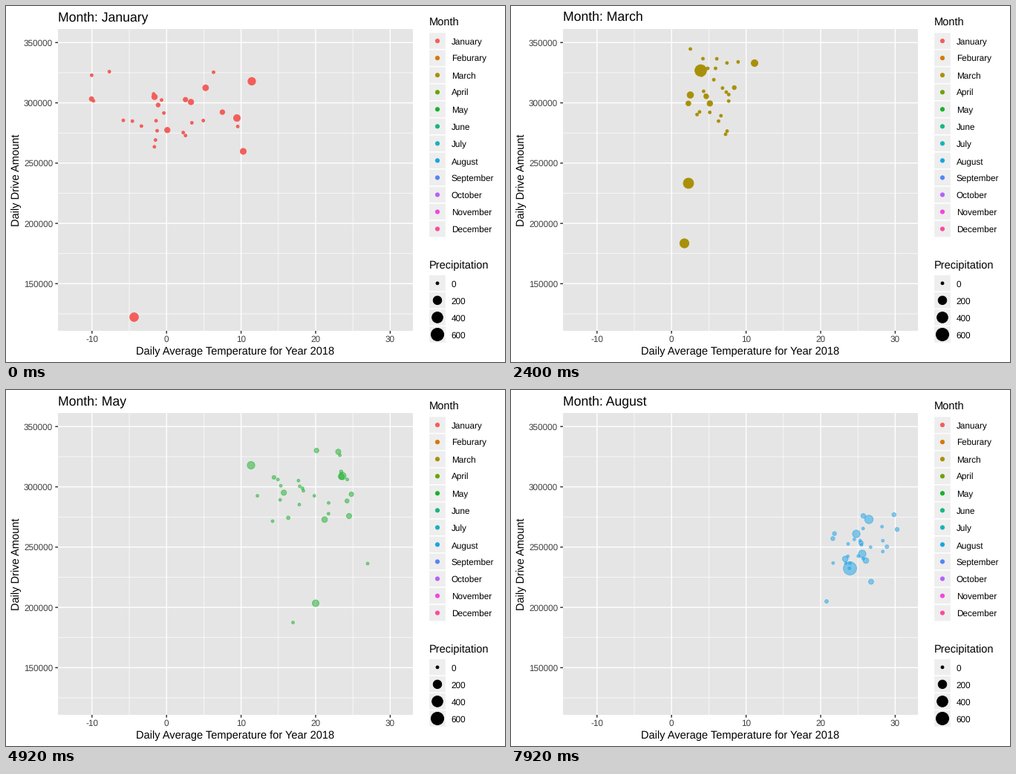
These frames come from a looping animation (672 px wide and 480 px high, 8 s). A matplotlib script:

```python
import random

import matplotlib.pyplot as plt
from matplotlib.animation import FuncAnimation
from matplotlib.patches import Rectangle

W, H, DPI = 672, 480, 96
PX = 72 / DPI              # points per pixel
STEP, TICK, LOOP = 120, 40, 8000
DRY, STROKE = 2.4, 0.945   # smallest dot radius and dot outline, px
KEY = 23.04                # legend row height

MONTHS = ["January", "Feburary", "March", "April", "May", "June", "July",
          "August", "September", "October", "November", "December"]
COLORS = ["#F35E5A", "#D57808", "#A89008", "#6BA30A", "#17B12B", "#18B67D",
          "#17B3B7", "#1AA2E8", "#5086F7", "#B75FFC", "#F047DD", "#FC4A9F"]
# Step at which each month has half faded out
HALF = [6, 14, 23, 32, 41, 49, 58, 66]

plt.rcParams["font.family"] = "Liberation Sans"
plt.rcParams["text.hinting"] = "none"
fig = plt.figure(figsize=(W / DPI, H / DPI), dpi=DPI, facecolor="white")
ax = fig.add_axes([0, 0, 1, 1])
ax.set(xlim=(0, W), ylim=(H, 0))
ax.autoscale(False)
ax.axis("off")


def box(x0, y0, x1, y1, color, edge="none", lw=0):
    ax.add_patch(Rectangle((x0, y0), x1 - x0, y1 - y0, facecolor=color,
                           edgecolor=edge, linewidth=lw * PX, snap=False))


def line(x0, y0, x1, y1, color, lw, z=2):
    ax.plot([x0, x1], [y0, y1], color=color, lw=lw * PX, zorder=z,
            solid_capstyle="butt", snap=False)


def text(x, y, s, size, color="black", **kw):
    return ax.text(x, y, s, fontsize=size, color=color, va="baseline", **kw)


def dots(points, color):
    xs, ys, radii = zip(*points)
    areas = [(2 * (r - STROKE / 2) * PX) ** 2 for r in radii]
    return ax.scatter(xs, ys, s=areas, c=color, edgecolors=color,
                      linewidths=STROKE * PX, zorder=4)


def temp_x(t):
    return 216.2 + 10.04 * t


def drive_y(k):
    return 49.3 + (350 - k) * 1.6255


def month_days(seed, count, xs, ys, wettest=()):
    """The wettest days as (x, y, radius), the others strewn over a box."""
    rng = random.Random(seed)
    days = list(wettest)
    while len(days) < count:
        rain = rng.uniform(0.4, 2) if rng.random() < 0.25 else 0
        days.append((rng.triangular(*xs), rng.triangular(*ys), DRY + rain))
    return days


# Panel, grid and axes
L, T, R, B = 70, 31, 548, 438
box(L, T, R, B, "#E5E5E5")
for t in range(-5, 30, 10):
    line(temp_x(t), T, temp_x(t), B, "white", 0.71)
for k in range(125, 350, 50):
    line(L, drive_y(k), R, drive_y(k), "white", 0.71)
for t in range(-10, 40, 10):
    x = temp_x(t)
    line(x, T, x, B, "white", 1.42, 3)
    line(x, B, x, B + 3.7, "#2B2B2B", 1.42)
    text(x, 453, str(t), 8.8, "#404040", ha="center")
for k in range(150, 400, 50):
    y = drive_y(k)
    line(L, y, R, y, "white", 1.42, 3)
    line(L - 3.7, y, L, y, "#2B2B2B", 1.42)
    text(63.2, y + 4.3, f"{k}000", 8.8, "#404040", ha="right")
text(308.8, 470, "Daily Average Temperature for Year 2018", 11, ha="center")
text(18, 234.5, "Daily Drive Amount", 11, rotation=90, ha="center",
     rotation_mode="anchor")


def legend(title, base, top, labels, radii, colors):
    text(569.5, base, title, 11)
    mids = [top + KEY * (i + 0.5) for i in range(len(labels))]
    for y, label in zip(mids, labels):
        box(569.5, y - KEY / 2, 592.5, y + KEY / 2, "#EEEEEE", "white", 1.42)
        text(599.6, y + 4.7, label, 8.8)
    dots([(581, y, r) for y, r in zip(mids, radii)], colors)


legend("Month", 27, 35.6, MONTHS, [3.08] * 12, COLORS)
amounts = range(0, 800, 200)
legend("Precipitation", 354, 362.3, [str(a) for a in amounts],
       [DRY + 7.1 * (a / 690) ** 0.5 for a in amounts], ["black"] * 4)

# Seed, day count, x range, y range and wettest days, in stage pixels
days = [
    month_days(1, 31, (85, 335), (68, 240),
               [(172.5, 419.5, 6.3), (331, 101.5, 5.6), (311, 151, 5),
                (319.5, 196, 4.5), (200, 122.5, 4.2)]),
    month_days(2, 28, (168, 385), (60, 220),
               [(336.5, 193, 6.8), (250.5, 186, 6.3), (248, 105, 6),
                (272, 180, 5.8), (286, 95, 5.5)]),
    month_days(3, 31, (226, 312), (47, 182),
               [(255.5, 87, 8.3), (239, 239, 7.4), (233.5, 320, 6.6),
                (328, 77, 5), (241.5, 120, 4.8)]),
    month_days(4, 30, (248, 420), (50, 180),
               [(314, 161, 9.4), (350, 89, 6.6), (250, 197, 5.7),
                (266.5, 130, 5.4), (325, 221, DRY)]),
    month_days(5, 31, (332, 492), (72, 190),
               [(330, 101.5, 5.6), (453, 116, 5.5), (417, 287.5, 5),
                (386.5, 313.5, DRY), (487, 234, DRY)]),
    month_days(6, 30, (385, 520), (75, 270)),
    month_days(7, 31, (430, 528), (143, 297),
               [(478.5, 166, 8.7), (453, 265, 6.8), (453, 153, 5.8),
                (439, 196.5, 5.8), (492, 331, DRY)]),
    month_days(8, 31, (426, 522), (144, 280),
               [(456.5, 240.5, 9.4), (482, 174.5, 6.2), (465, 194, 5.6),
                (473, 221, 5.6), (425, 285, 2.9)]),
]
clouds = [dots(points, color) for points, color in zip(days, COLORS)]
title = text(70, 20, "", 13.2)


def draw(i):
    step = i * TICK // STEP
    title.set_text("Month: " + MONTHS[sum(step > h for h in HALF)])
    start = 0
    for cloud, half in zip(clouds, HALF):
        end = half + 2
        cloud.set_visible(start <= step < end)
        cloud.set_alpha(max(0, min(1, (end - step) / 4)))
        start = end
    return [title, *clouds]


anim = FuncAnimation(fig, draw, frames=LOOP // TICK, interval=TICK,
                     repeat=True, repeat_delay=0, blit=False)
plt.show()
```
